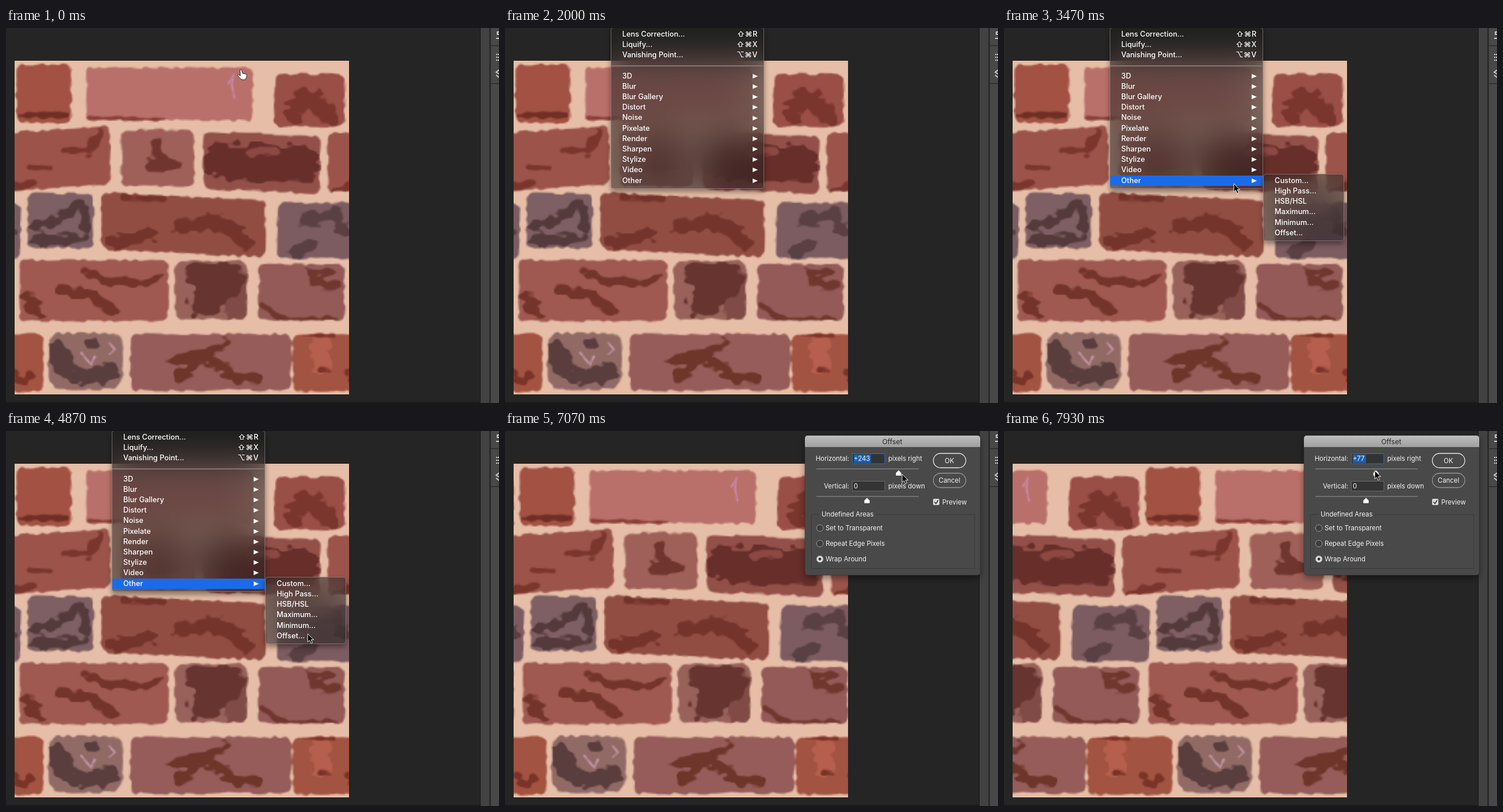
These frames come from a looping animation (858x653 px, 8000 ms). An HTML page with a canvas:

```html
<!DOCTYPE html>
<html lang="en">
<head>
<meta charset="utf-8">
<title>Offset filter on a brick tile</title>
<style>
html, body { margin: 0; width: 858px; height: 653px; overflow: hidden; background: #252525; }
body { font: 13px Inter, "DejaVu Sans", sans-serif; }
canvas, svg, .menu { position: absolute; }
canvas { left: 15px; top: 57px; }
svg { left: 0; top: 0; fill: #f4f4f4; }
.menu {
  box-sizing: border-box; padding: 2px 0 4px; color: #fff; font-size: 12.8px; font-weight: 500;
  border: 1px solid rgba(175, 160, 155, .55); border-radius: 5px;
  background: rgba(28, 28, 28, .5); backdrop-filter: blur(28px);
  box-shadow: 0 5px 10px rgba(0, 0, 0, .4);
}
.row { display: flex; justify-content: space-between; align-items: center;
  height: 18.2px; line-height: 18.2px; padding: 0 10px 0 19px; white-space: pre; }
.row.on { background: #1a6bea; }
.line { height: 18.2px; background: linear-gradient(#8a7471, #8a7471) center / 100% 2px no-repeat; }
.key { letter-spacing: .6px; }
.more { border: solid transparent; border-width: 4.5px 0 4.5px 9px; border-left-color: #fff; }
</style>
</head>
<body>
<canvas id="wall" width="582" height="581"></canvas>
<svg id="panels" width="858" height="653"></svg>
<div id="menus"></div>
<svg id="ui" width="858" height="653"></svg>
<script>
const LOOP = 8000, FPS = 15, ROW = 18.2, DOC = 240, SIZE = 582, SCALE = SIZE / DOC;
const $ = id => document.getElementById(id);
const clamp = (v, lo, hi) => Math.max(lo, Math.min(hi, v));
const smooth = u => u * u * (3 - 2 * u);

// ---- brick tile: distance fields roughened by noise ----
const tile = document.createElement('canvas');
tile.width = tile.height = DOC;
const art = tile.getContext('2d');
art.fillStyle = '#e6bea7';
art.fillRect(0, 0, DOC, DOC);
const image = art.getImageData(0, 0, DOC, DOC);

function hash(i, j) {
  const s = Math.sin(i * 127.1 + j * 311.7) * 43758.5453;
  return s - Math.floor(s) - .5;
}
function noise(x, y, cell) {
  x /= cell; y /= cell;
  const i = Math.floor(x), j = Math.floor(y), u = smooth(x - i), v = smooth(y - j);
  const top = hash(i, j) * (1 - u) + hash(i + 1, j) * u;
  const low = hash(i, j + 1) * (1 - u) + hash(i + 1, j + 1) * u;
  return top * (1 - v) + low * v;
}

// Fill where dist(x, y) is negative, in stage pixels; x wraps around the middle.
function paint(color, middle, dist) {
  const rgb = [1, 3, 5].map(k => parseInt(color.slice(k, k + 2), 16));
  for (let j = 0; j < DOC; j++) for (let i = 0; i < DOC; i++) {
    let x = 15 + (i + .5) * SCALE;
    x -= SIZE * Math.round((x - middle) / SIZE);
    const cover = clamp(.5 - dist(x, 57 + (j + .5) * SCALE) / 3.5, 0, 1);
    if (cover) rgb.forEach((c, k) => {
      const at = (j * DOC + i) * 4 + k;
      image.data[at] += (c - image.data[at]) * cover;
    });
  }
}

function segment(x, y, ax, ay, bx, by) {
  const dx = bx - ax, dy = by - ay;
  const f = clamp(((x - ax) * dx + (y - ay) * dy) / (dx * dx + dy * dy), 0, 1);
  return Math.hypot(x - ax - f * dx, y - ay - f * dy);
}

function brick(color, x0, y0, x1, y1, tilt = 0, r = 12) {
  const cx = (x0 + x1) / 2, cy = (y0 + y1) / 2, w = x1 - x0;
  const edge = (x, y) => {
    const qx = Math.abs(x - cx) - w / 2 + r;
    const qy = Math.abs(y - cy - tilt * (x - cx) / w) - (y1 - y0) / 2 + r;
    const d = Math.hypot(Math.max(qx, 0), Math.max(qy, 0)) + Math.min(Math.max(qx, qy), 0) - r;
    return d > 6 ? d : d + noise(x, y, 9) * 5;
  };
  paint(color, cx, edge);
  // Each stain is a ragged stroke: width, then the points it runs through.
  const self = {
    stain(tint, ...strokes) {
      for (const [width, ...p] of strokes) paint(tint, cx, (x, y) => {
        const out = edge(x, y);
        if (out > 2) return out;
        let d = Infinity;
        for (let k = 0; k + 3 < p.length; k += 2) d = Math.min(d, segment(x, y, p[k], p[k + 1], p[k + 2], p[k + 3]));
        const rough = Math.min(width * .8, 17);
        return Math.max(out, d - width / 2 + noise(x, y * 1.5, 13) * rough);
      });
      return self;
    }
  };
  return self;
}

brick('#a25143', 18, 63, 113, 165).stain('#702f25', [9, 24, 153, 105, 152]);
brick('#ba706a', 140, 69, 429, 161, 0, 7).stain('#8a4038', [6, 146, 157, 275, 159])
  .stain('#d090bd', [3, 387, 96, 396, 82, 393, 98, 397, 121]);
brick('#994e46', 467, 80, 589, 172).stain('#7a352c', [30, 500, 150, 515, 118, 540, 125, 560, 157]);

brick('#9c544a', -22, 177, 181, 279, -14)
  .stain('#7a352c', [14, 165, 182, 144, 214], [10, 100, 214, 142, 213], [8, 42, 243, 77, 244], [12, -10, 282, 48, 270]);
brick('#9f6059', 201, 177, 327, 275).stain('#70352f', [17, 264, 198, 264, 222, 300, 240, 252, 238]);
brick('#935049', 344, 184, 546, 284, 8).stain('#672e2a', [62, 378, 232, 515, 236]).stain('#8c4842', [12, 425, 217, 470, 214]);

brick('#7e5f64', 38, 288, 152, 383).stain('#553a3c', [17, 50, 345, 90, 335, 128, 305, 138, 345], [19, 55, 371, 130, 368]);
brick('#924d43', 166, 293, 452, 392, 14)
  .stain('#75342b', [10, 205, 294, 275, 296], [22, 185, 375, 250, 360], [25, 305, 347, 375, 336, 420, 376]);
brick('#7c5c61', 472, 304, 607, 401).stain('#5a3f43', [21, 520, 333, 570, 325, 592, 355], [27, 525, 376, 505, 391]);

brick('#9f5951', 23, 404, 282, 510)
  .stain('#74342b', [14, 140, 422, 170, 438, 240, 445, 272, 430], [17, 95, 456, 150, 468, 185, 492], [21, 33, 468, 55, 495]);
brick('#98625b', 294, 406, 419, 507).stain('#804a46', [42, 400, 435, 402, 492]).stain('#67342f', [52, 340, 430, 385, 435, 345, 480]);
brick('#945a58', 440, 411, 589, 509).stain('#70372f', [16, 530, 425, 565, 426, 535, 440, 570, 448], [9, 446, 482, 478, 506, 573, 507]);

brick('#a35341', 499, 533, 647, 633).stain('#b65f4e', [38, 545, 550, 552, 585])
  .stain('#7a3327', [9, 548, 595, 562, 598], [14, 595, 603, 615, 616, 622, 606], [5, 518, 535, 570, 536]);
brick('#916a66', 74, 531, 203, 629, 0, 22).stain('#5a3d3d', [28, 90, 558, 104, 598, 140, 613, 186, 593], [14, 145, 548, 154, 548])
  .stain('#cf9db0', [3, 131, 566, 148, 586, 154, 573], [3, 180, 548, 189, 560, 180, 568]);
brick('#965c59', 217, 533, 496, 631).stain('#6e352b', [18, 292, 579, 350, 569, 385, 550], [19, 300, 603, 352, 575, 398, 607, 432, 606]);
art.putImageData(image, 0, 0);

const view = $('wall').getContext('2d');
function drawWall(offset) {
  const dx = (offset % DOC) * SCALE;
  for (const x of [dx - SIZE, dx]) view.drawImage(tile, x, 0, SIZE, SIZE);
}

// ---- interface ----
const rect = (x, y, w, h, more = '') => `<rect x="${x}" y="${y}" width="${w}" height="${h}" ${more}/>`;
const text = (x, y, s, more = '') => `<text x="${x}" y="${y + 4.3}" ${more}>${s}</text>`;

$('panels').innerHTML = rect(0, 651, 825, 2, 'fill="#1c1c1c"') + rect(825, 0, 1, 653, 'fill="#181818"') +
  rect(826, 0, 15, 653, 'fill="#424242"') + rect(841, 0, 3, 653, 'fill="#2b2b2b"') + rect(844, 0, 14, 653, 'fill="#484848"') +
  [30, 96].map(y => rect(842, y, 16, 1.5, 'fill="#2b2b2b"')).join('') +
  '<path d="M858,7h-3v4h3M858,18h-5M853,46h2m1,0h2M853,51h2m1,0h2M853,56h2m1,0h2M858,73l-5,4l5,3M853,82l5,4" fill="none" stroke="#d0d0d0" stroke-width="1.8"/>';

function menu(id, x, firstRow, w, rows) {
  const body = rows.map(row => {
    if (row === '-') return '<div class="line"></div>';
    const [label, key] = row.split('|');
    const side = key === 'sub' ? '<i class="more"></i>' : key ? `<span class="key">${key}</span>` : '';
    return `<div class="row">${label}${side}</div>`;
  }).join('');
  $('menus').insertAdjacentHTML('beforeend',
    `<div id="${id}" class="menu" style="left:${x}px;top:${firstRow - ROW / 2 - 3}px;width:${w}px">${body}</div>`);
}
menu('select', 104, 11, 267, ['Find Layers|⌥⇧⌘F', 'Isolate Layers', '-', 'Color Range...', 'Focus Area...',
  'Select and Mask...|⌥⌘R', '-', 'Modify|sub', '-', 'Grow', 'Similar', '-', 'Transform Selection', '-',
  'Edit in Quick Mask Mode', '-', 'Load Selection...', 'Save Selection...', '-', 'New 3D Extrusion']);
menu('filter', 184, 11, 267, ['Lens Correction...|⇧⌘R', 'Liquify...|⇧⌘X', 'Vanishing Point...|⌥⌘V', '-',
  ...'3D,Blur,Blur Gallery,Distort,Noise,Pixelate,Render,Sharpen,Stylize,Video,Other'.split(',').map(s => s + '|sub')]);
menu('other', 451, 266, 141, ['Custom...', 'High Pass...', 'HSB/HSL', 'Maximum...', 'Minimum...', 'Offset...']);

const slider = (id, y) => rect(542, y - 1, 178, 2, 'fill="#707070"') +
  `<path id="${id}" d="M0,-5l5,5v5h-10v-5z" transform="translate(630,${y + 7})" fill="#fff" stroke="#333" stroke-width=".6"/>`;
const pill = (y, s, line) => rect(745.5, y, 56.5, 25, `rx="12.5" fill="none" stroke="${line}" stroke-width="1.3"`) +
  text(773.5, y + 12.2, s, 'text-anchor="middle"');
const radio = (y, s, on) => `<circle cx="548" cy="${y}" r="5.8" fill="${on ? '#dedede' : '#3d3d3d'}" stroke="#999"/>` +
  (on ? `<circle cx="548" cy="${y}" r="2.4" fill="#333"/>` : '') + text(558, y, s);

$('ui').innerHTML = `<linearGradient id="bar" x2="0" y2="1"><stop stop-color="#bdbdbd"/><stop offset="1" stop-color="#a0a0a0"/></linearGradient>
  <g id="dialog" font-size="11.4" style="filter:drop-shadow(0 5px 6px rgba(0,0,0,.4))">
  ${rect(522, 8, 305, 243, 'rx="5" fill="#494949" stroke="#333" stroke-width=".6"')}
  <path d="M522,28V13q0,-5 5,-5h295q5,0 5,5v15z" fill="url(#bar)"/>
  ${text(674, 18.5, 'Offset', 'text-anchor="middle" fill="#292929" font-size="12.2"')}
  ${text(599, 48, 'Horizontal:', 'text-anchor="end"')}${text(667, 48, 'pixels right')}
  ${text(599, 96, 'Vertical:', 'text-anchor="end"')}${text(667, 96, 'pixels down')}
  ${rect(604.5, 39.5, 56.5, 17.5, 'fill="#333" stroke="#2f6ec0"')}${rect(607, 41, 23, 14.5, 'id="pick" fill="#1e5fae"')}
  ${text(607, 48, '+94', 'id="value"')}
  ${rect(604.5, 87.5, 56.5, 17, 'fill="#343434" stroke="#686868"')}${text(607, 96, '0')}
  ${slider('knob', 66)}${slider('still', 114)}
  ${pill(39, 'OK', '#e6e6e6')}${pill(73.5, 'Cancel', '#969696')}
  ${rect(745, 118, 11, 11, 'rx="2" fill="#d8d8d8"')}<path d="M747.5,123.5l2.5,3l4,-6" fill="none" stroke="#333" stroke-width="1.6"/>
  ${text(761, 124, 'Preview')}
  <path d="M547,145.5H533.5V239.5H817.5V145.5H645" fill="none" stroke="#393939"/>
  ${text(551, 145, 'Undefined Areas')}
  ${radio(169, 'Set to Transparent')}${radio(196, 'Repeat Edge Pixels')}${radio(223, 'Wrap Around', true)}</g>
  <path id="hand" d="M-3,-9q2,-2 3,1l2,5l5,1q3,1 2,4l-2,6h-7l-6,-6q-2,-3 2,-2l2,1z" fill="#fff" stroke="#222"/>
  <g id="arrow"><path d="M0,0V14.5l3.4,-3l2.4,5.3l2.6,-1.1l-2.4,-5.2h4.5z" fill="#0b0b0b" stroke="#e8e8e8"/>
  <path id="move" d="M14,11l4,4l-4,6l-4,-6z" fill="#262626" stroke="#aaa" stroke-width=".5"/></g>`;

// ---- timeline ----
const OPEN_SELECT = 925, OPEN_FILTER = 1465, ENTER = 2325, OPEN_OTHER = 3465, CHOOSE = 4800, OPEN_DIALOG = 4995, DRAG = 6730;
const route = [[ENTER, 352, 5], [3200, 400, 271], [3470, 400, 271], [3930, 456, 268], [4130, 456, 268], [CHOOSE, 525, 353],
  [5000, 525, 353], [5600, 606, 211], [5800, 712, 137], [5870, 712, 137], [6530, 650, 69]];
const drag = [[DRAG, 94], [7000, 243], [7070, 243], [7530, 300], [7570, 300], [7930, 77]];

function sample(keys, t) {
  const i = keys.findIndex(k => k[0] > t);
  if (i < 1) return keys[i ? keys.length - 1 : 0].slice(1);
  const a = keys[i - 1], b = keys[i], f = smooth((t - a[0]) / (b[0] - a[0]));
  return a.slice(1).map((v, k) => v + (b[k + 1] - v) * f);
}
const show = (id, on) => { $(id).style.visibility = on ? 'visible' : 'hidden'; };
const move = (id, x, y) => $(id).setAttribute('transform', `translate(${x},${y})`);
function highlight(id, row) {
  [...$(id).children].forEach((el, i) => el.classList.toggle('on', i === row));
}

function render(t) {
  const within = (a, b) => t >= a && t < b;
  const value = Math.round(sample(drag, t)[0]);
  const [x, y] = t < DRAG ? sample(route, t) : [624 + value * .276, 66.2 + value * .036];

  const lift = clamp((t - 10) / 180, 0, 1);
  show('hand', t < 265);
  move('hand', 410 - 24 * lift, 82 - 30 * lift);

  show('select', within(OPEN_SELECT, OPEN_FILTER));
  show('filter', within(OPEN_FILTER, OPEN_DIALOG));
  show('other', within(OPEN_OTHER, OPEN_DIALOG));
  highlight('filter', t < ENTER ? -1 : x > 451 ? 14 : Math.round((y - 11) / ROW));
  const blink = within(CHOOSE, CHOOSE + 125);
  highlight('other', x > 451 && !blink ? Math.round((y - 266) / ROW) : -1);

  show('dialog', t >= OPEN_DIALOG);
  $('value').textContent = '+' + value;
  $('pick').setAttribute('width', 2 + 7 * $('value').textContent.length);
  move('knob', 630 + value * .2265, 73);

  show('arrow', t >= ENTER);
  $('move').setAttribute('opacity', within(OPEN_DIALOG, 5795) ? 1 : 0);
  move('arrow', x, y);
  // The preview trails the slider by one tick.
  drawWall(t < OPEN_DIALOG + 60 ? 0 : Math.round(sample(drag, t - 60)[0]));
}

const start = performance.now();
let last = -1;
function tick() {
  const t = (performance.now() - start) % LOOP;
  const n = Math.floor((t + 4) * FPS / 1000);
  if (n !== last) render(Math.round(n * 100 / FPS) * 10);
  last = n;
  requestAnimationFrame(tick);
}
tick();
</script>
</body>
</html>
```
